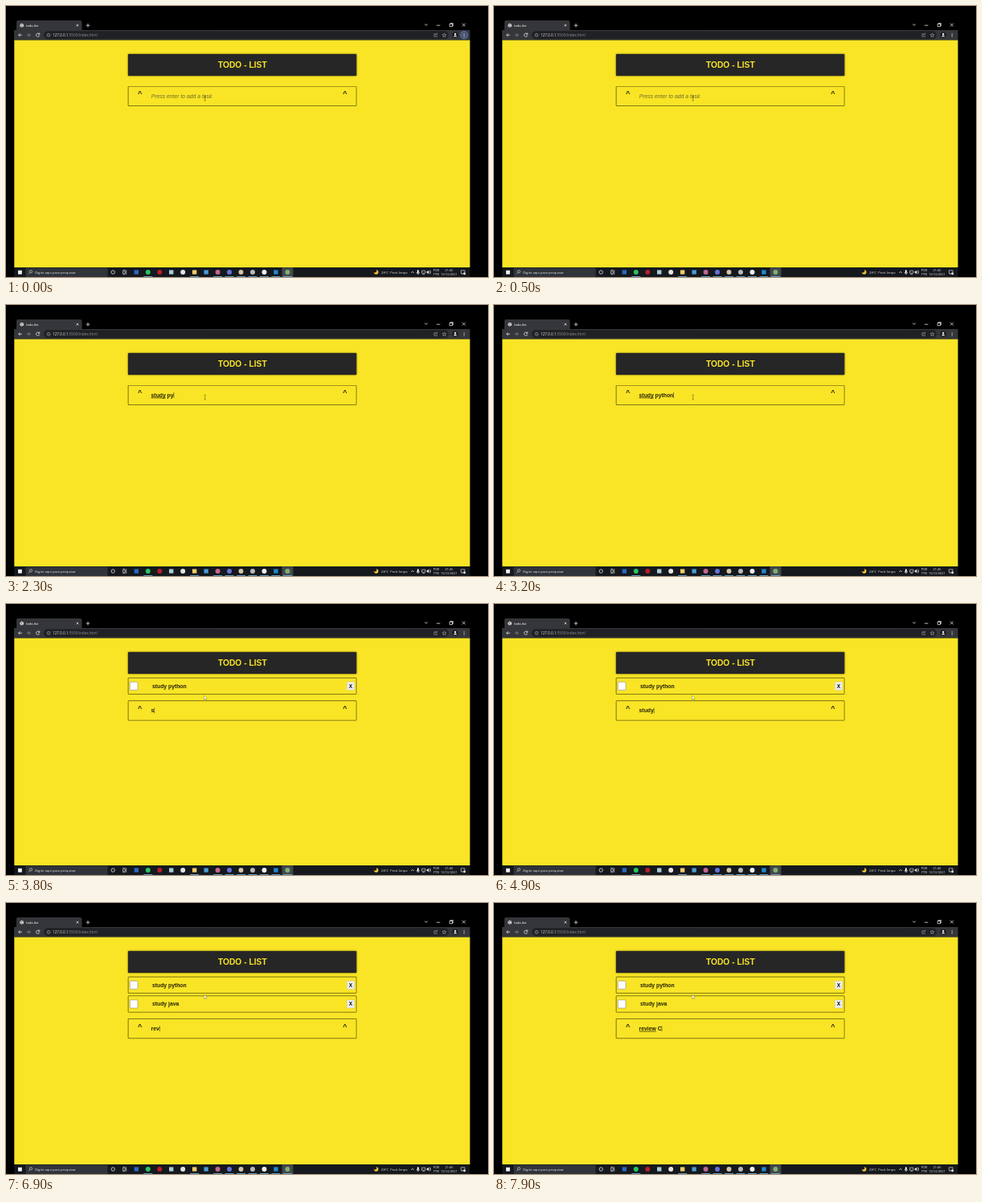
These frames come from a looping animation (600 px wide and 338 px high, 8 s). An HTML page:

```html
<!DOCTYPE html>
<html lang="en">
<head>
<meta charset="utf-8">
<title>todo-list</title>
<style>
  html, body { margin: 0; width: 100%; height: 100%; overflow: hidden; background: #000; }
  svg { display: block; width: 100vw; height: 100vh; }
  text { font-family: "Liberation Sans", Arial, sans-serif; white-space: pre; }
  .ui text { font-family: "Open Sans", "Noto Sans", sans-serif; font-size: 4.2px; fill: #e4e4e4; }
  .ui .url { font-size: 4.6px; }
  .ui .tiny { font-size: 3.85px; text-anchor: middle; }
  .line { fill: none; stroke: #e2e2e2; stroke-width: .8; }
  .box { fill: #f9e526; stroke: #4d4508; stroke-width: .45; filter: drop-shadow(.5px .6px .6px rgba(0, 0, 0, .8)); }
  .head { fill: #262626; filter: drop-shadow(.5px .7px .8px rgba(0, 0, 0, .75)); }
  .title { font: bold 10.25px "Liberation Sans", Arial, sans-serif; fill: #f9e526; text-anchor: middle; }
  .task { font-size: 6.8px; font-weight: bold; fill: #262207; }
  .hint { font-size: 6.8px; font-style: italic; fill: #716a2b; }
  .hat { font-size: 9px; font-weight: bold; fill: #2c270a; text-anchor: middle; }
  .word { text-decoration: underline #6b2a08 .6px; text-underline-offset: .9px; }
  .ring { animation: ring 8s linear infinite; }
  @keyframes ring { 0%, 1.25% { opacity: 1; } 4%, 100% { opacity: 0; } }
</style>
</head>
<body>
<svg viewBox="0 0 600 338" preserveAspectRatio="none">
  <defs>
    <g id="item">
      <rect class="box" x="152.2" y="92.2" width="283.8" height="20.2" rx=".5"/>
      <rect x="154.2" y="97.2" width="9.8" height="10.2" rx="1" fill="#fff" stroke="#8a8a80" stroke-width=".6"/>
      <rect x="424.3" y="97.2" width="9.6" height="10.2" rx=".6" fill="#efefef" stroke="#bdb87c" stroke-width=".4"/>
      <text class="task" x="429.1" y="104.7" text-anchor="middle" style="fill:#111">X</text>
    </g>
  </defs>
  <rect width="600" height="338" fill="#000"/>

  <g class="ui">
    <path d="M13 30V20q0-2 2-2H92q2.500 0 2.500 2V30Z" fill="#35363a"/>
    <rect x="10" y="30" width="567.500" height="12.600" fill="#35363a"/>
    <rect x="47" y="31.300" width="504" height="10" rx="5" fill="#202124"/>
    <circle cx="19.700" cy="24.200" r="2.400" fill="#d4d6d8"/>
    <path d="M18 23.200l1.600 .2-.3 1.300 1.300 1.300M20 22.300l1.500 1" stroke="#55585c" stroke-width=".6" fill="none"/>
    <text x="25" y="25.700" style="font-weight:600;font-size:3.800px">todo-list</text>
    <path class="line" d="M87.600 22.800l2.600 2.600m0-2.600l-2.600 2.600M99.700 24.200h4.600m-2.300-2.300v4.600"/>
    <path class="line" d="M521.200 22.600l1.800 1.700 1.800-1.700M536 24.200h4.400M552.200 22.400h3.300v3.300h-3.300ZM553.200 22.400v-.9h3.200v3.200h-.9M568 21.700l3.800 3.800m0-3.800l-3.800 3.800"/>
    <path class="line" d="M20 36.200h-4.400m2-2l-2 2 2 2"/>
    <path class="line" style="stroke:#8b8d90" d="M25.700 36.200h4.400m-2-2l2 2-2 2"/>
    <path class="line" d="M41.300 34.800a2.100 2.100 0 1 0 .4 1.900M41.800 33.500v1.800h-1.800"/>
    <g class="line" style="stroke:#a9abad;stroke-width:.6">
      <circle cx="53" cy="36.300" r="2"/>
      <path d="M53 36v1.300M53 34.900v.5"/>
      <path d="M535 34.800h-2v3.400h3.500v-1.200M534.300 36.500q.3-1.700 2.600-1.700m-1-1.100l1.100 1.100-1.100 1.100"/>
      <path d="M545.600 33.900l.7 1.700 1.800 .1-1.400 1.200 .5 1.700-1.600-1-1.600 1 .5-1.700-1.400-1.200 1.800-.1Z"/>
    </g>
    <text class="url" x="58" y="37.900">127.0.0.1<tspan fill="#8d9093">:5500/index.html</tspan></text>
    <circle cx="559.200" cy="36.200" r="3.600" fill="#18191b"/>
    <path d="M557.300 38.200q0-1.700 1.900-1.700t1.900 1.700Z" fill="#f0f0f0"/>
    <circle cx="559.200" cy="35" r="1.200" fill="#f0f0f0"/>
    <g class="ring">
      <circle cx="570.200" cy="36.200" r="4.700" fill="#4b5468" stroke="#4f7fd0" stroke-width=".9"/>
    </g>
    <path d="M570.200 34.300v4.200" stroke="#eee" stroke-width="1" stroke-dasharray=".9 .75"/>
  </g>

  <rect x="10.300" y="42.600" width="567.200" height="283.600" fill="#f9e526"/>
  <rect class="head" x="152" y="60" width="284.200" height="27" rx=".6"/>
  <text class="title" x="294.300" y="76.700">TODO - LIST</text>

  <g id="first"><use href="#item"/><text class="task" x="182" y="104.700">study python</text></g>
  <g id="second"><use href="#item" y="23.700"/><text class="task" x="182" y="128.400">study java</text></g>

  <g id="field">
    <rect class="box" x="152.200" y="100.300" width="283.800" height="24.200" rx=".5"/>
    <text class="hat" x="166.700" y="112.400">^</text>
    <text class="hat" x="422" y="112.400">^</text>
    <text class="hint" id="hint" x="180.800" y="114.600">Press enter to add a task</text>
    <text class="task" id="typed" x="180.600" y="114.600"><tspan id="head"></tspan><tspan id="tail"></tspan></text>
    <rect id="caret" y="109" width=".55" height="7" fill="#222"/>
  </g>
  <path id="beam" d="M246.600 112.200h2.200M247.700 112.200v5.800M246.600 118h2.200" fill="none" stroke="#6d6512" stroke-width=".6"/>
  <path id="arrow" d="M246.600 114.300v5l1.200-1 .8 1.700 .9-.4-.8-1.600h1.600Z" fill="#fff" stroke="#6f6a3c" stroke-width=".4"/>

  <g class="ui">
    <rect x="10.300" y="326.200" width="567.200" height="11.800" fill="#15181d"/>
    <rect x="24.500" y="326.600" width="102" height="11.400" fill="#30343a"/>
    <rect x="343.500" y="326.200" width="14" height="11.800" fill="#42474c"/>
    <rect x="15" y="329.800" width="4.800" height="4.800" fill="#f2f2f2"/>
    <circle class="line" cx="31" cy="331.300" r="1.600" style="stroke-width:.6"/>
    <path class="line" d="M29.900 332.500l-1.800 1.900" style="stroke-width:.6"/>
    <text x="36" y="333.700" fill="#c8c8c8">Digite aqui para pesquisar</text>
    <circle class="line" cx="133.200" cy="332" r="2.200"/>
    <path class="line" d="M145.400 330.700h3v2.700h-3ZM145.400 329.300h3M145.400 334.700h3M149.700 329.300v5.500" style="stroke-width:.65"/>
    <g id="apps"></g>
    <circle cx="460.800" cy="332" r="2.700" fill="#f5c83c"/>
    <circle cx="459.500" cy="330.700" r="1.900" fill="#15181d"/>
    <text x="467" y="333.600">28°C</text>
    <text x="478.300" y="333.600" style="font-size:4px">Pred. limpo</text>
    <path class="line" d="M504.300 333l1.800-1.800 1.800 1.800M511.300 332q0 1.900 1.600 1.900t1.600-1.900M512.900 334v1"/>
    <rect x="511.900" y="329.200" width="2" height="3.800" rx="1" fill="#eee"/>
    <path class="line" d="M517.600 330.200h4.400v3h-4.400ZM518.500 334.600h2.700M526.600 330.400q1.300 1.600 0 3.200M527.700 329.600q1.900 2.400 0 4.800" style="stroke-width:.65"/>
    <path d="M523.800 331.100h.8l1.300-1.300v4.400l-1.300-1.300h-.8Z" fill="#eee"/>
    <text class="tiny" x="535.600" y="331.200">POR</text>
    <text class="tiny" x="535.600" y="336.300">PTB</text>
    <text class="tiny" x="551.500" y="331.200">21:46</text>
    <text class="tiny" x="551.500" y="336.300">16/12/2021</text>
    <path class="line" d="M566.400 329.800h4.600v3.600h-2l-1.200 1.300v-1.300h-1.400Z" style="stroke-width:.65"/>
    <circle cx="570.700" cy="333.700" r="1.500" fill="#d8d8d8"/>
  </g>
</svg>
<script>
  const LOOP = 8000, HALF_BLINK = 370;
  const $ = id => document.getElementById(id);

  // Taskbar marks: colour, shape, running
  const apps = [
    ["#2b67c5", "s", 0], ["#27c45f", "c", 1], ["#b51f2a", "c", 0], ["#a9cbd6", "s", 0],
    ["#e4e4e4", "c", 0], ["#f0cc68", "s", 1], ["#4b9bd5", "s", 0], ["#c2678f", "c", 1],
    ["#6472d8", "c", 1], ["#d2c4a4", "c", 1], ["#b8b8b8", "c", 1], ["#f0f0f0", "c", 1],
    ["#2188d0", "s", 1], ["#7fae70", "c", 1]
  ];
  $("apps").innerHTML = apps.map(([color, shape, running], i) => {
    const x = 162.3 + i * 14.47;
    const mark = shape === "c"
      ? `<circle cx="${x}" cy="332" r="3" fill="${color}"/>`
      : `<rect x="${x - 2.7}" y="329.4" width="5.4" height="5.2" fill="${color}"/>`;
    const bar = `<rect x="${x - 5.5}" y="337.1" width="11" height=".9" fill="#6ba6c9"/>`;
    return mark + (running ? bar : "");
  }).join("");

  // Each round: text, the time of every key, and the time of Enter
  const rounds = [
    { text: "study python", keys: [900, 1000, 1100, 1200, 1400, 1700, 2100, 2250, 2400, 2550, 2700, 2850], enter: 3500 },
    { text: "study java", keys: [3790, 3900, 4000, 4080, 4150, 5000, 5100, 5200, 5350, 5480], enter: 5700 },
    { text: "review C", keys: [6600, 6750, 6900, 7050, 7200, 7350, 7700, 7800], enter: LOOP }
  ];
  const fieldShift = [0, 20.5, 44.2];
  const show = (id, on) => { $(id).style.display = on ? "" : "none"; };
  let last = null;

  function draw(t) {
    const n = rounds.findIndex(r => t < r.enter);
    const { text, keys } = rounds[n];
    const count = keys.filter(k => k <= t).length;
    const typed = text.slice(0, count);
    const state = n + typed;
    if (state !== last) {
      last = state;
      const gap = typed.indexOf(" ");
      $("head").textContent = gap < 0 ? "" : typed.slice(0, gap);
      $("head").setAttribute("class", "word");
      $("tail").textContent = gap < 0 ? typed : typed.slice(gap);
      $("caret").setAttribute("x", 180.7 + $("typed").getComputedTextLength());
      $("field").setAttribute("transform", `translate(0 ${fieldShift[n]})`);
      show("hint", !count);
      show("first", n > 0);
      show("second", n > 1);
      show("beam", n === 0);
      show("arrow", n > 0);
    }
    const lit = count && Math.floor((t - keys[count - 1]) / HALF_BLINK) % 2 === 0;
    show("caret", lit);
  }

  function tick() {
    draw(performance.now() % LOOP);
    requestAnimationFrame(tick);
  }
  tick();
</script>
</body>
</html>
```
